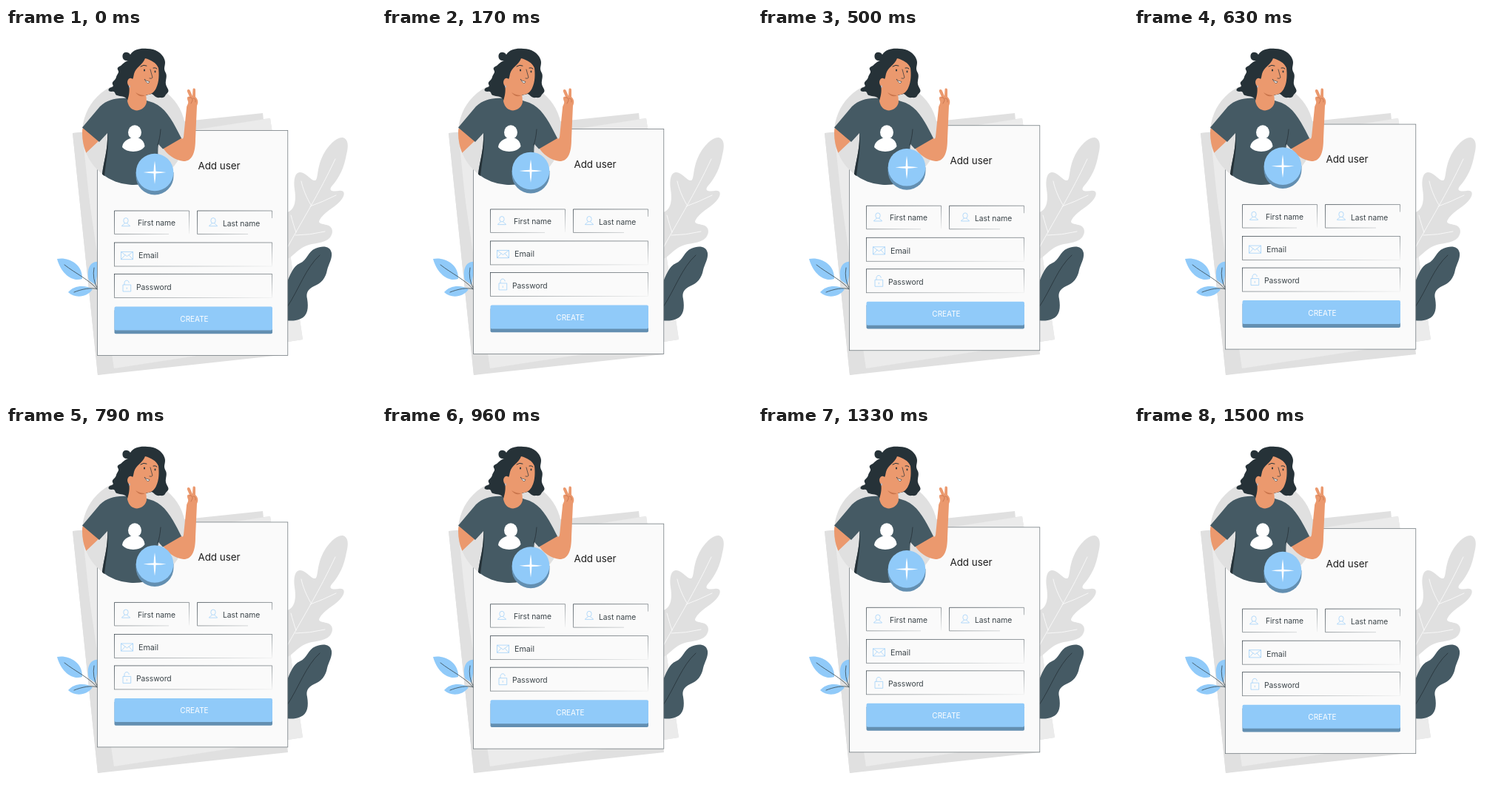
An HTML page that plays this animation: 500 by 500 pixels, repeating every 1.54 s.

```html
<!DOCTYPE html>
<html lang="en">
<head>
<meta charset="utf-8">
<title>Add user</title>
<style>
  html, body { margin: 0; width: 100%; height: 100%; overflow: hidden; background: #fff; }
  svg { display: block; width: 100%; height: 100%; }
  text { font-family: Inter, Roboto, sans-serif; font-size: 10.3px; fill: #3a4348; }
  .line { fill: none; stroke-linecap: round; stroke-linejoin: round; }
  .field { fill: none; stroke: url(#edge); stroke-width: .75; }
  .icon { fill: none; stroke: #90caf9; stroke-width: .65; stroke-linejoin: round; }
  .skin { fill: #eb996e; }
  .shirt { fill: #455a64; }
  .hair { fill: #263238; }
  .blue { fill: #90caf9; }
  .shade { fill: #638fb1; }
</style>
</head>
<body>
<svg viewBox="0 0 500 500">
  <defs>
    <linearGradient id="edge" x1="0" y1="0" x2="1" y2="1">
      <stop offset="0" stop-color="#37424a"/>
      <stop offset=".5" stop-color="#757d82"/>
      <stop offset="1" stop-color="#f0f1f1"/>
    </linearGradient>
    <clipPath id="disc"><circle cx="173" cy="142" r="70"/></clipPath>
    <g id="user" class="icon">
      <ellipse cy="-2.2" rx="3.2" ry="3.7"/>
      <path d="M-1.6 1.2C-1.8 3-5 3-5.5 5.2H5.5C5 3 1.8 3 1.6 1.2"/>
    </g>
  </defs>

  <!-- loose sheets -->
  <path fill="#e0e0e0" d="M90 142L347 115 381 441 124 469Z"/>
  <path fill="#e0e0e0" d="M340 124L357 122 401 421 381 424Z"/>
  <path fill="#ebebeb" d="M102 161L357 122 401 421 146 460Z"/>
  <path fill="#e0e0e0" d="M90 142L103 141 137 467 124 469Z"/>

  <!-- plants -->
  <path fill="#e0e0e0" d="M378 250C392 246 392 231 390 218C388 204 391 194 398 195C407 196 412 207 418 206C422 204 420 190 427 175C434 159 447 147 455 148C463 150 463 160 460 171C457 188 451 202 440 214C435 221 443 221 450 220C457 219 459 224 454 231C447 241 434 246 426 256C420 264 424 264 433 266C442 268 443 276 438 283C430 292 414 290 404 295C393 300 387 310 378 313Z"/>
  <path class="line" stroke="#fafafa" stroke-width=".9" d="M380 297C398 264 423 224 445 177M412 239C406 229 401 217 399 207M411 241Q428 235 446 226M392 276C389 268 387 260 385 253M391 280Q410 280 431 275"/>
  <path class="shirt" d="M378 348C384 333 388 322 397 318C407 314 408 302 418 298C427 294 438 294 440 304C441 312 436 319 434 327C432 338 426 345 416 349C408 353 405 358 407 366C409 378 408 389 398 393C391 396 385 396 378 395Z"/>
  <path class="line" stroke="#263238" stroke-width=".8" d="M380 377C396 353 405 324 424 307"/>
  <path class="blue" d="M69 312C83 309 104 318 103 339C89 344 74 331 69 312ZM84 357C92 347 108 347 117 353C110 364 93 366 84 357ZM126 316C114 314 108 326 112 341L121 347Z"/>
  <path class="line" stroke="#37474f" stroke-width=".8" d="M79 320C94 332 113 340 125 355M92 357C102 353 115 350 124 353M119 324Q116 339 124 353"/>

  <!-- form -->
  <g class="float">
    <rect x="123.5" y="138.5" width="257.3" height="304" fill="#fafafa" stroke="#6d767b" stroke-width=".75"/>
    <text x="259.4" y="190.7" style="font-size:13.4px;fill:#1d1d1d">Add user</text>
    <path class="field" d="M220 278.500H146.500V247H247.500V278"/>
    <path class="field" d="M327 278.500H258.500V247H359.500V257"/>
    <rect class="field" x="146.5" y="290" width="213" height="32"/>
    <rect class="field" x="146.5" y="332.5" width="213" height="32"/>
    <use href="#user" x="162" y="262.5"/>
    <use href="#user" x="280" y="262.5"/>
    <path class="icon" d="M155.500 302.500H171.500V312.700H155.500ZL163.500 308.500 171.500 302.500M155.500 312.700L161 306.700M171.500 312.700L166 306.700"/>
    <path class="icon" d="M158 347H168.700V356H158ZM160 347V344.500C160 340 166.200 340 166.200 344.500M163.300 350.500V353"/>
    <text x="178" y="267.2">First name</text>
    <text x="293" y="268">Last name</text>
    <text x="179" y="311.4" style="font-size:10.7px">Email</text>
    <text x="176" y="353.8">Password</text>
    <rect class="shade" x="146.5" y="380" width="213.5" height="33.3" rx="2"/>
    <rect class="blue" x="146.5" y="376.5" width="213.5" height="32" rx="2"/>
    <text x="254.5" y="397" text-anchor="middle" style="font-size:10px;fill:#fff">CREATE</text>
  </g>

  <!-- person -->
  <circle cx="173" cy="142" r="70" fill="#e0e0e0"/>
  <path class="skin" clip-path="url(#disc)" d="M104 135L127 151 108 169 98 150Z"/>
  <path class="skin" d="M211 160L236 148C238 150 239 151 240 147L244 108C244 104 247 103 246 99C244 94 245 92 248 93L245 86C244 83 247 82 248.500 84L252 92 252.500 83C253 81 256 81 256 84L256 93C260 97 260 101 258 105L256 150C256 170 251 180 240 180C229 179 217 171 211 160Z"/>
  <path class="line" stroke="#b8643f" stroke-width=".6" d="M248 94Q252 93 252 98L250 102M253 95Q257 95 256 100"/>
  <path class="shirt" d="M164 95C148 94 137 97 127 106L103 134.500 126 154 137 142C138 164 132 180 130 197.500A70 70 0 0 0 207 203C207 186 204 172 206 157L212 163.500 237 149C227 129 218 112 205 104Q198 100 190 98Z"/>
  <path class="hair" d="M137 142C140 160 135 180 133 200L130 197.500C132 180 138 164 137 142Z"/>
  <path class="line" stroke="#263238" stroke-width=".8" d="M209 137Q208 150 205 158"/>
  <path class="hair" d="M166 44C160 45 157 42 157.500 37C158 32 165 31 168 36C173 28 183 27 191 28C202 28 211 34 214 42C217 49 212 53 215 59C219 65 215 70 216 76C217 81 222 84 218 88C214 91 216 95 208 94C202 95 201 91 197 89L164 97C160 91 155 93 150 91C146 90 149 85 143 86C136 86 138 81 143 80C148 78 141 76 145 72C150 68 148 66 151 62C155 57 147 56 153 52C158 50 158 46 166 44Z"/>
  <path class="skin" d="M166 77C168 87 165 94 164 99C166 108 171 111 177 111.500C184 111 189 106 190 100L189 87Z"/>
  <path class="skin" d="M188 41C185 50 175 53 173 62C172 66 172 68 171 69C167 65 162 71 165 77C168 83 174 86 180 88C190 93 199 90 203 81C207 73 207 62 206 54C203 47 196 43 188 41Z"/>
  <path fill="#c9754c" d="M175 87Q181 91 188 91Q181 95 175 87Z"/>
  <path class="line" stroke="#263238" stroke-width="1" d="M182 52Q186 49 190 51M199 54Q202 53 204 55"/>
  <ellipse class="hair" cx="187" cy="57" rx="1" ry="1.5"/>
  <ellipse class="hair" cx="201.500" cy="59" rx=".9" ry="1.400"/>
  <path class="line" stroke="#263238" stroke-width=".7" d="M195 56L198 67Q197 69 194 68"/>
  <path fill="#fff" stroke="#263238" stroke-width=".6" d="M187 69Q189 72 194 72.500Q192 78 187 69Z"/>
  <path class="line" stroke="#90caf9" d="M167 78V80"/>

  <!-- badge on the shirt -->
  <ellipse cx="174" cy="141" rx="9" ry="9.700" fill="#fff"/>
  <path fill="#fff" d="M157 161C158 153 164 151 168 149H180C184 151 187 154 187.500 160C182 169 163 169 157 161Z"/>

  <!-- plus button -->
  <g class="float">
    <path class="shade" d="M175.500 195V200A25.500 25.500 0 0 0 226.500 200V195Z"/>
    <circle class="blue" cx="201" cy="195" r="25.300"/>
    <path fill="#fff" d="M201 179.500Q202.300 187 202.400 193.800 209 194 216.500 195 209 196.200 202.400 196.400 202.300 203 201 211 199.700 203 199.600 196.400 193 196.200 185.500 195 193 194 199.600 193.800 199.700 187 201 179.500Z"/>
  </g>
</svg>
<script>
  const LOOP = 1540, STEPS = 37, PHASE = 55 / LOOP, REACH = 4.2;
  const floats = document.querySelectorAll('.float');

  // Bobbing curve between a cosine and a triangle wave, moving at 24 steps a second
  function wave(turn) {
    const angle = 2 * Math.PI * (turn + PHASE);
    return Math.cos(angle) + .08 * Math.cos(3 * angle);
  }

  function draw() {
    const step = Math.floor(performance.now() % LOOP / LOOP * STEPS);
    const y = REACH * (wave(step / STEPS) - wave(0));
    for (const part of floats) part.setAttribute('transform', `translate(0 ${y.toFixed(2)})`);
    requestAnimationFrame(draw);
  }
  draw();
</script>
</body>
</html>
```
